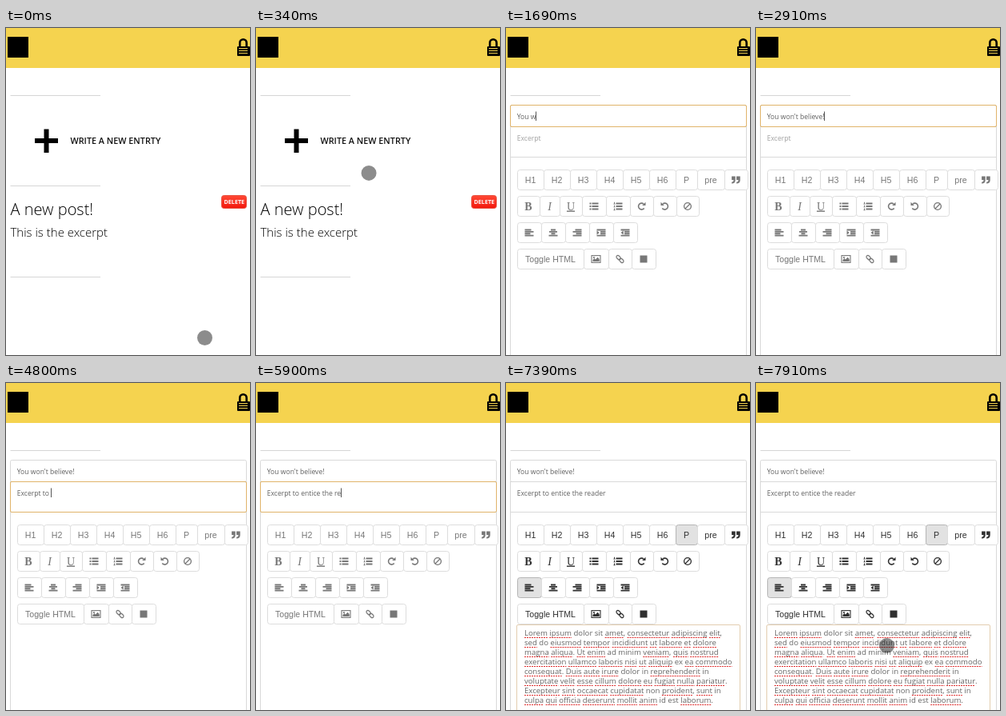
These frames come from a looping animation (305x409 px, 7.99 s). An HTML page:

```html
<!DOCTYPE html>
<html lang="en">
<head>
<meta charset="utf-8">
<title>Writing a post</title>
<style>
html, body { margin: 0; width: 100%; height: 100%; overflow: hidden; background: #fff; }
svg { display: block; width: 305px; height: 409px; }
text { font-family: "Open Sans", sans-serif; white-space: pre; }
.btn { font: 10.6px "Liberation Sans", Arial, sans-serif; fill: currentColor; text-anchor: middle; }
.serif { font: 14px "Liberation Serif", "Times New Roman", serif; fill: currentColor; text-anchor: middle; }
.field { font-size: 8.6px; }
</style>
</head>
<body>
<svg id="stage" viewBox="0 0 305 409" xmlns="http://www.w3.org/2000/svg"></svg>
<script>
const LOOP = 7990;
const TITLE = "You won't believe!";
const EXCERPT = "Excerpt to entice the reader";
const BODY = [
  "Lorem ipsum dolor sit amet, consectetur adipiscing elit,",
  "sed do eiusmod tempor incididunt ut labore et dolore",
  "magna aliqua. Ut enim ad minim veniam, quis nostrud",
  "exercitation ullamco laboris nisi ut aliquip ex ea commodo",
  "consequat. Duis aute irure dolor in reprehenderit in",
  "voluptate velit esse cillum dolore eu fugiat nulla pariatur.",
  "Excepteur sint occaecat cupidatat non proident, sunt in",
  "culpa qui officia deserunt mollit anim id est laborum."
];
const KNOWN_WORDS = new Set(["dolor", "sit", "do", "ad", "minim", "ex", "in", "non", "id", "est"]);
const LINE_HEIGHT = 12.05;

// Typing bursts: start, end, characters at start, characters at end
const TITLE_KEYS = [[1200, 1200, 1, 1], [1350, 1780, 2, 7], [2010, 2740, 8, 17], [2910, 2910, 18, 18]];
const EXCERPT_KEYS = [
  [3610, 3610, 1, 1], [3780, 3780, 2, 2], [3960, 3960, 3, 3], [4110, 4110, 4, 4],
  [4280, 4800, 5, 11], [4910, 5010, 12, 14], [5130, 5430, 15, 19],
  [5620, 5900, 20, 24], [6000, 6080, 25, 26], [6230, 6350, 27, 28]
];
// Pointer strokes: time, x, y
const POINTER = [
  [[0, 248.5, 387.5], [40, 248.5, 387.5], [400, 120, 141], [460, 120, 141], [690, 52.5, 109.5], [730, 52.5, 109.5], [800, 58, 117], [960, 58, 117]],
  [[6520, 58, 117], [6930, 111.5, 337.5], [7210, 111.5, 337.5]],
  [[7540, 111.5, 337.5], [7600, 48, 372], [7680, 130, 392], [7780, 248, 350], [7840, 215, 314], [7900, 163.5, 328.5], [LOOP, 163.5, 328.5]]
];
const EDITOR_AT = 460, EXCERPT_AT = 3190, BODY_AT = 7040, PASTE_AT = 7210, SPELL_AT = 7330;

const rect = (x, y, w, h, attrs = "") => `<rect x="${x}" y="${y}" width="${w}" height="${h}" ${attrs}/>`;
const text = (x, y, str, attrs = "") => `<text x="${x}" y="${y}" ${attrs}>${str}</text>`;
const path = (d, attrs = 'fill="currentColor"') => `<path d="${d}" ${attrs}/>`;
const stroke = (w) => `fill="none" stroke="currentColor" stroke-width="${w}"`;
const rule = y => rect(5.5, y, 112.5, 1, 'fill="#d6d6d6"');
const bar = (x, y, w, h = 1.9) => `M${x} ${y}h${w}v${h}h${-w}z`;

// Icons are drawn around (0, 0)
const label = str => text(0, 4, str, 'class="btn"');
const serif = (str, attrs) => text(0, 4.5, str, `class="serif" ${attrs}`);
const listBars = [-4.5, -1, 2.5].map(y => bar(-2.5, y, 8, 2)).join("");
const list = marks => path(listBars + marks);
const align = (widths, side) => path(widths.map((w, i) =>
  bar([-5.5, -w / 2, 5.5 - w][side], -4.5 + i * 2.4, w)).join(""));
const indent = arrow => path(bar(-5.5, -4.5, 11) + bar(-1, -2.1, 6.5) + bar(-1, .3, 6.5) + bar(-5.5, 2.7, 11) + arrow);
const turn = flip => `<g transform="scale(${flip} 1)">${path("M3.2 2.6A4 4 0 1 1 2.6 -3", stroke(1.6))}${path("M5 -5.2V-.9H.7z")}</g>`;
const quote = path([-5.4, .6].map(x => `M${x} -4.6h4.6v4.6q0 4.6 -4.6 4.6v-1.9q2.4 0 2.4 -2.7h-2.4z`).join(""));
const ban = `<circle r="4.4" ${stroke(1.3)}/>` + path("M-3 3L3 -3", stroke(1.3));
const picture = rect(-5.5, -4.4, 11, 8.8, stroke(1.1)) +
  path("M-4 3V1L-2 -1L-.6 .4L2 -2.3L4.2 0V3z") + `<circle cx="-2.6" cy="-2" r="1.1" fill="currentColor"/>`;
const chain = `<g transform="rotate(45)">` +
  [-5.6, -.4].map(x => rect(x, -1.9, 6, 3.8, `rx="1.9" ${stroke(1.2)}`)).join("") + "</g>";
const block = rect(-4.5, -4.5, 9, 9, 'fill="currentColor"');

// Each row: top, then [width, icon, active when body is focused]
const ROWS = [
  [177.5, [33, label("H1")], [33, label("H2")], [33, label("H3")], [33, label("H4")], [33, label("H5")],
    [33, label("H6")], [27, label("P"), 1], [34, label("pre")], [29, quote]],
  [210.5, [28, serif("B", 'style="font-weight:700"')], [25, serif("I", 'style="font-style:italic"')],
    [28, serif("U", 'text-decoration="underline"')], [30, list([-4.5, -1, 2.5].map(y => bar(-5.5, y, 2, 2)).join(""))],
    [30, list([-5.2, -1.3, 2.6].map(y => bar(-5, y, 1, 2.6) + bar(-5.6, y + 2, 2.2, .6)).join(""))],
    [29, turn(1)], [29, turn(-1)], [28, ban]],
  [243.5, [30, align([8, 11, 7, 11], 0), 1], [30, align([6, 10, 5, 11], 1)], [30, align([8, 11, 7, 11], 2)],
    [30, indent("M-5.5 -2.4L-2.2 .1L-5.5 2.6z")], [30, indent("M-2.2 -2.4L-5.5 .1L-2.2 2.6z")]],
  [276.5, [83, label("Toggle HTML")], [31, picture], [29, chain], [30, block]]
];

function toolbar() {
  let out = "";
  for (const [top, ...buttons] of ROWS) {
    let x = 14;
    for (const [width, icon, active] of buttons) {
      const cls = active ? 'class="active"' : "";
      out += rect(x + .5, top, width, 25, `rx="3" fill="#fff" stroke="#ddd" ${cls}`);
      out += `<g transform="translate(${x + width / 2} ${top + 12.5})">${icon}</g>`;
      x += width;
    }
  }
  return out;
}

const header = rect(0, 0, 305, 50, 'fill="#f5d34f"') +
  rect(2, 11, 26, 26) +
  path("M292.3 24V18.5a4.2 4.2 0 0 1 8.4 0V24", 'fill="none" stroke="#000" stroke-width="2.6"') +
  rect(289, 23, 16, 12, 'rx="1"') +
  [25, 28, 31].map(y => rect(291, y, 11, 1, 'fill="#f5d34f"')).join("");

const home = rule(197) + rule(311) +
  path("M36 138H47.5V126.5H53.5V138H65V144H53.5V156H47.5V144H36z", 'fill="#000"') +
  text(80.5, 145, "WRITE A NEW ENTRTY", 'font-size="10.8" font-weight="600" fill="#111"') +
  text(5.5, 234, "A new post!", 'font-size="20" font-weight="300" fill="#000"') +
  text(5.5, 261, "This is the excerpt", 'font-size="15" font-weight="300" fill="#000"') +
  rect(269.5, 209.5, 31, 16, 'rx="3" fill="url(#red)" stroke="#e8503f"') +
  text(285.3, 220.3, "DELETE", 'font-size="7.2" font-weight="700" fill="#fff" text-anchor="middle"');

const ring = (id, x, y, w, h, color = "#e0b46a") =>
  rect(x, y, w, h, `id="${id}" rx="1.5" fill="none" stroke="${color}"`);

const editor = `<g fill="none" stroke="#d9d9d9">` +
  rect(5.5, 96.5, 295, 27, 'rx="2"') + rect(5.5, 123.5, 295, 38) + rect(5.5, 161.5, 295, 260) + "</g>" +
  ring("titleRing", 5.5, 96.5, 295, 27) + ring("excerptRing", 5.5, 123.5, 295, 38) +
  text(13.7, 114, "", 'id="title" class="field"') + text(13.7, 141, "", 'id="excerpt" class="field"') +
  rect(0, 0, 1, 11.5, 'id="caret" fill="#555"') +
  `<g id="toolbar">${toolbar()}</g>` + ring("bodyRing", 13.5, 302.5, 279, 120, "#e3cdb0") +
  `<g id="body" fill="#666" font-size="9.6">${BODY.map((s, i) => text(23, 316 + i * LINE_HEIGHT, s)).join("")}</g>` +
  path("", 'id="spelling" fill="none" stroke="#e02b2b" stroke-dasharray="2 1"');

document.getElementById("stage").innerHTML =
  `<defs><linearGradient id="red" x2="0" y2="1"><stop stop-color="#ff4a36"/><stop offset="1" stop-color="#f2170c"/></linearGradient></defs>` +
  rect(0, 0, 305, 409, 'fill="#fff"') + header + rule(84) +
  `<g id="home">${home}</g><g id="editor">${editor}</g>` +
  rect(304, 0, 1, 409, 'id="scrollbar" fill="#000"') +
  `<circle id="pointer" r="9.5" fill="#000" fill-opacity=".45"/>`;

const ui = {};
document.querySelectorAll("svg [id]").forEach(el => ui[el.id] = el);
const activeButtons = document.querySelectorAll(".active");

const underlines = [...ui.body.children].map((line, i) =>
  [...BODY[i].matchAll(/[a-z]+/gi)].filter(m => !KNOWN_WORDS.has(m[0])).map(m => {
    const x = line.getStartPositionOfChar(m.index).x;
    const y = Math.round(318 + i * LINE_HEIGHT) + .5;
    return `M${x} ${y}h${line.getSubStringLength(m.index, m[0].length)}`;
  }).join("")).join("");
ui.spelling.setAttribute("d", underlines);

const show = (el, on) => el.setAttribute("visibility", on ? "inherit" : "hidden");

function typedCount(keys, t) {
  let count = 0;
  for (const [start, end, from, to] of keys)
    if (t >= start) count = from + Math.floor((to - from) * Math.min(1, (t - start) / (end - start || 1)) + .01);
  return count;
}

function fill(el, value, count, placeholder) {
  el.textContent = count ? value.slice(0, count) : placeholder;
  el.setAttribute("fill", count ? "#606060" : "#a0a0a0");
  return 13.7 + (count ? el.getComputedTextLength() : 0);
}

function pointerAt(t) {
  const strokePath = POINTER.find(s => t >= s[0][0] && t < s[s.length - 1][0]);
  if (!strokePath) return null;
  const i = strokePath.findIndex(p => p[0] > t);
  const [t0, x0, y0] = strokePath[i - 1], [t1, x1, y1] = strokePath[i];
  const k = (t - t0) / (t1 - t0);
  return [x0 + (x1 - x0) * k, y0 + (y1 - y0) * k];
}

function render(t) {
  const editing = t >= EDITOR_AT, inBody = t >= BODY_AT, inExcerpt = t >= EXCERPT_AT && !inBody;
  show(ui.home, !editing);
  show(ui.editor, editing);
  show(ui.titleRing, editing && t < EXCERPT_AT);
  show(ui.excerptRing, inExcerpt);
  show(ui.bodyRing, inBody);
  show(ui.body, t >= PASTE_AT);
  show(ui.spelling, t >= SPELL_AT);

  const titleEnd = fill(ui.title, TITLE, typedCount(TITLE_KEYS, t), "Title");
  const excerptEnd = fill(ui.excerpt, EXCERPT, typedCount(EXCERPT_KEYS, t), "Excerpt");
  show(ui.caret, editing && t < 6520);
  ui.caret.setAttribute("x", Math.floor(inExcerpt ? excerptEnd : titleEnd));
  ui.caret.setAttribute("y", inExcerpt ? 131.5 : 104.5);

  ui.toolbar.style.color = inBody ? "#303030" : "#777";
  activeButtons.forEach(b => {
    b.setAttribute("fill", inBody ? "#e2e2e2" : "#fff");
    b.setAttribute("stroke", inBody ? "#b5b5b5" : "#ddd");
  });

  ui.scrollbar.setAttribute("opacity", editing ? .2 * Math.max(0, Math.min(1, (1020 - t) / 120)) : 0);

  const spot = pointerAt(t);
  show(ui.pointer, spot);
  if (spot) {
    ui.pointer.setAttribute("cx", spot[0]);
    ui.pointer.setAttribute("cy", spot[1]);
  }
}

function tick() {
  render(performance.now() % LOOP);
  requestAnimationFrame(tick);
}
tick();
</script>
</body>
</html>
```
